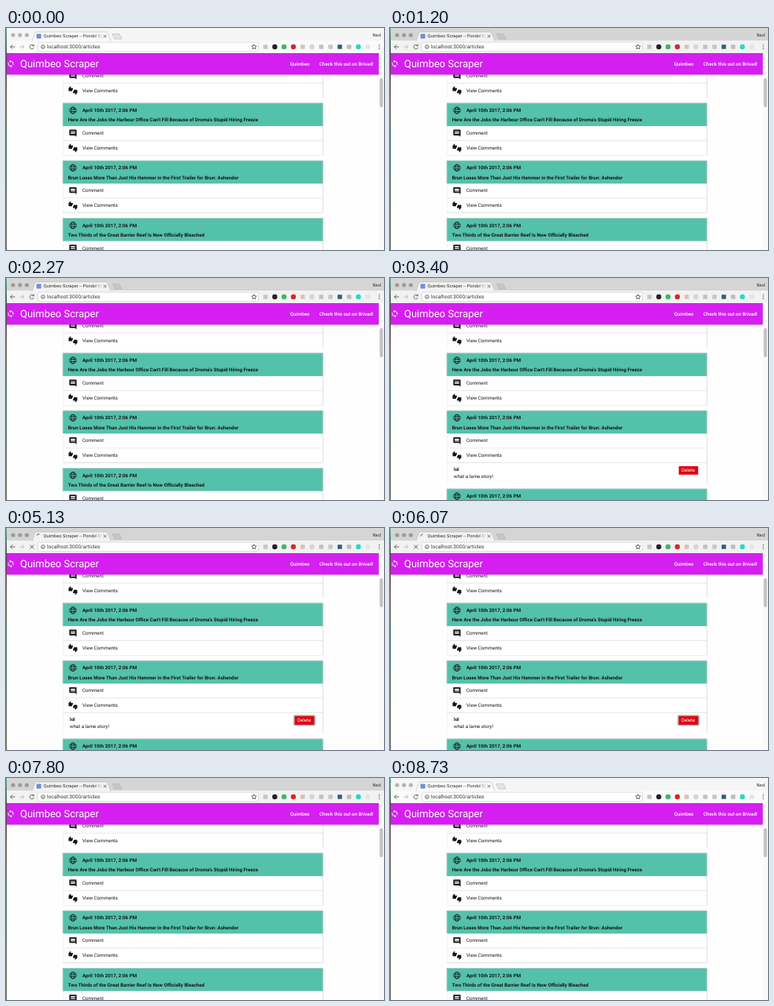
An HTML page for the animation above (8.87 s loop, 480 px wide and 283 px high).

```html
<!DOCTYPE html>
<html lang="en">
<head>
<meta charset="utf-8">
<title>Quimbeo Scraper</title>
<style>
  html, body { margin: 0; width: 100%; height: 100%; overflow: hidden; background: #fff; }
  svg { display: block; }
  text { font: 6.17px Roboto, sans-serif; text-rendering: geometricPrecision; fill: #161616; }
  .b { font-weight: 700; }
  .w { fill: #fff; }
  .link { font-weight: 500; }
  .brand { font-size: 13px; }
  .ui { font-size: 5.75px; fill: #333; }
  .url { font-size: 6.55px; }
  .strip { fill: #d5d5d5; }
  .bar { fill: #f2f2f2; }
  .light { fill: #9b9b9b; }
  .off .strip { fill: #f5f5f5; }
  .off .bar { fill: #fafafa; }
  .off .light { fill: #b4b4b4; }
  .line { stroke: #ddd; stroke-width: .7; }
  .edge { fill: none; stroke: #ddd; stroke-width: .5; }
  .pen { fill: none; stroke: #555; stroke-width: .9; }
  .pale { stroke: #bbb; }
  .card { filter: drop-shadow(0 .9px .7px #0005); }
  .teal { fill: #54c1aa; }
</style>
</head>
<body>
<script>
const LOOP = 8870;
const ACTIVE = [1000, 7870];
const OPEN = 2560, SLIDE = 350, EXTRA = 26.5;
const FOCUS = 5000, LOAD = [5070, 6260], RELOADED = 6200;
const TOP = 22.4, PITCH = 73.3, BODY = 37.2;

const ICONS = {
  comment: 'M22 4c0-1.1-.9-2-2-2H4c-1.1 0-2 .9-2 2v12c0 1.1.9 2 2 2h14l4 4V4zm-4 10H6v-2h12v2zm0-3H6V9h12v2zm0-3H6V6h12v2z',
  thumbs: 'M12 6c0-.55-.45-1-1-1H5.82l.66-3.18.02-.23c0-.31-.13-.59-.33-.8L5.38 0 .44 4.94C.17 5.21 0 5.59 0 6v6.5c0 .83.67 1.5 1.5 1.5h6.75c.62 0 1.15-.38 1.38-.91l2.26-5.29c.07-.17.11-.36.11-.55V6zm10.5 4h-6.75c-.62 0-1.15.38-1.38.91l-2.26 5.29c-.07.17-.11.36-.11.55V18c0 .55.45 1 1 1h5.18l-.66 3.18-.02.24c0 .31.13.59.33.8l.79.78 4.94-4.94c.27-.27.44-.65.44-1.06v-6.5c0-.83-.67-1.5-1.5-1.5z',
  sync: 'M12 4V1L8 5l4 4V6c3.31 0 6 2.69 6 6 0 1.01-.25 1.97-.7 2.8l1.46 1.46C19.54 15.03 20 13.57 20 12c0-4.42-3.58-8-8-8zm0 14c-3.31 0-6-2.69-6-6 0-1.01.25-1.97.7-2.8L5.24 7.74C4.46 8.97 4 10.43 4 12c0 4.42 3.58 8 8 8v3l4-4-4-4v3z'
};

const rect = (x, y, w, h, attrs = '') => `<rect x="${x}" y="${y}" width="${w}" height="${h}" ${attrs}/>`;
const text = (x, y, s, cls = '') => `<text x="${x}" y="${y}" class="${cls}">${s}</text>`;
const dot = (x, y, r, attrs) => `<circle cx="${x}" cy="${y}" r="${r}" ${attrs}/>`;
const icon = (name, cx, cy, fill = '#161616', k = .46) =>
  `<path transform="translate(${cx} ${cy}) scale(${k}) translate(-12 -12)" d="${ICONS[name]}" fill="${fill}"/>`;
const globe = (cx, cy) => `<g transform="translate(${cx} ${cy})" fill="none" stroke="#161616" stroke-width=".8">
  <circle r="4.2"/><ellipse rx="1.9" ry="4.2"/><path d="M-3.8-1.5H3.8M-3.8 1.5H3.8"/></g>`;

const comment = `<path class="line" d="M0 37.2H330"/>
  ${text(9, 47.8, 'lol', 'b')}${text(9, 56.8, 'what a lame story!')}
  ${rect(293.5, 40.5, 27, 12.8, 'id="ring" rx="1.5" fill="#b9b0b0" stroke="#8a7f7f" stroke-width=".5"')}
  ${rect(294.7, 41.6, 24.6, 10.8, 'fill="#e0000f"')}${text(298, 49.2, 'Delete', 'w')}`;

const card = (title, i) => `<g id="card${i}" class="card" transform="translate(72 ${TOP + i * PITCH})">
  ${rect(0, 0, 330.5, 29.3, 'class="teal"')}
  <path class="edge" d="M.2 29V.2H330.3V29"/>
  ${globe(13, 9.3)}${text(25, 11.4, 'April 10th 2017, 2:06 PM', 'b')}${text(6.7, 23.6, title, 'b')}
  <svg id="body${i}" y="29.3" width="330.5" height="${BODY}">
    ${rect(0, 0, 330.5, 70, 'fill="#fff"')}
    <path class="edge" d="M0 .2H330.5M.2 0V70M330.3 0V70"/>
    ${icon('comment', 13, 9.2)}${text(25, 11.2, 'Comment')}
    <path class="line" d="M0 18.5H330"/>
    ${icon('thumbs', 13, 28)}${text(25, 29.9, 'View Comments')}
    ${i === 2 ? comment : ''}
  </svg></g>`;

const titles = [
  '',
  "Here Are the Jobs the Harbour Office Can't Fill Because of Droma's Stupid Hiring Freeze",
  'Brun Loses More Than Just His Hammer in the First Trailer for Brun: Ashendor',
  'Two Thirds of the Great Barrier Reef Is Now Officially Bleached'
];

const round = ['#222', '#3fb56c', '#d8262c', '#d5d5d5', '#20dcc0'];
const extensions = ['#c0cabf', '#222', '#3fb56c', '#d8262c', '#dcc0b8', '#d5d5d5', '#c2c2c2', '#c6c6c6', '#2f5f78', '#bdbdbd', '#20dcc0', '#e4e4e4']
  .map((c, i) => {
    const x = 329.5 + i * 11.8;
    return round.includes(c) ? dot(x, 24, 3.2, `fill="${c}"`) : rect(x - 2.8, 21.2, 5.6, 5.6, `rx=".6" fill="${c}"`);
  }).join('');

const browser = `${rect(0, 0, 480, 17, 'class="strip"')}${rect(0, 16, 480, 16, 'class="bar"')}
  <path class="bar" d="M33 16.5L37 6Q37.5 5 39 5H127Q128.5 5 129 6L133 16.5Z" stroke="#aaa" stroke-width=".5"/>
  ${rect(33.5, 16, 99, 1.2, 'class="bar"')}
  <path d="M135 7.5H144L147 14H138Z" fill="#0001" stroke="#aaa" stroke-width=".5"/>
  ${[9, 17.7, 26.4].map(x => dot(x, 9, 2.6, 'class="light"')).join('')}
  ${rect(38.7, 7.6, 6, 6, 'id="favicon" rx="1" fill="#6d8fd6"')}
  <path id="spinner" class="pen" d="M0-2.7A2.7 2.7 0 0 1 2.7 0"/>
  ${text(47.5, 12.3, 'Quimbeo Scraper -- Pondel M', 'ui')}
  ${rect(110, 6.5, 13, 8, 'fill="url(#fade)"')}
  <path class="pen" d="M124 8.8l3.4 3.4m0-3.4l-3.4 3.4"/>
  ${text(465.5, 10.8, 'Ned', 'ui')}
  ${rect(40.5, 18.2, 280, 11.6, 'rx="1.5" fill="#fff" stroke="#c8c8c8" stroke-width=".6"')}
  <path class="pen" d="M11.5 24H5.5m2.7-2.7L5.5 24l2.7 2.7"/>
  <path class="pen pale" d="M17 24h6m-2.7-2.7L23 24l-2.7 2.7"/>
  <path id="reload" class="pen" d="M34.8 22.2A2.7 2.7 0 1 0 35.4 25M35.3 20.8v2h-2"/>
  <path id="stop" class="pen" d="M30.4 21.5l5 5m0-5l-5 5"/>
  ${dot(47, 24, 2.3, 'class="pen"')}<path class="pen" d="M47 23.7v1.6"/>
  <path class="pen" d="M315 20.8l.9 2.1 2.3.2-1.7 1.5.5 2.2-2-1.2-2 1.2.5-2.2-1.7-1.5 2.3-.2z"/>
  ${extensions}
  ${[21.6, 24, 26.4].map(y => dot(474, y, .75, 'fill="#666"')).join('')}
  ${text(52, 26.2, 'localhost:3000/articles', 'ui url')}`;

const navbar = `${rect(1, 59.5, 472.5, 1, 'fill="#0002"')}${rect(1, 32, 472.5, 27.5, 'fill="#d41ff0"')}
  ${icon('sync', 6, 45.6, '#fff', .45)}${text(18, 50.2, 'Quimbeo Scraper', 'w brand')}
  ${text(360.7, 47.5, 'Quimbeo', 'w link')}${text(398, 47.5, 'Check this out on Brivad!', 'w link')}`;

document.body.innerHTML = `<svg id="stage" width="480" height="283" viewBox="0 0 480 283">
  <defs>
    <linearGradient id="fade"><stop stop-color="#f2f2f2" stop-opacity="0"/><stop offset="1" stop-color="#f2f2f2"/></linearGradient>
    <linearGradient id="desk" x2="0" y2="1"><stop stop-color="#5fae98"/><stop offset=".12" stop-color="#444"/>
      <stop offset=".3" stop-color="#7a5448"/><stop offset=".5" stop-color="#3f6f68"/><stop offset="1" stop-color="#6a645c"/></linearGradient>
  </defs>
  ${rect(0, 0, 480, 283, 'fill="#fefefe"')}
  ${titles.map(card).join('')}
  ${rect(473.5, 32, 6.5, 251, 'fill="#fafafa"')}${rect(474.6, 64, 4, 37, 'rx="2" fill="#c1c1c1"')}
  ${browser}${navbar}
  ${rect(0, 0, 1, 283, 'fill="url(#desk)"')}
</svg>`;

const $ = id => document.getElementById(id);
const within = (t, [a, b]) => t >= a && t < b;
const show = (id, on) => $(id).setAttribute('visibility', on ? 'visible' : 'hidden');

function draw() {
  const t = performance.now() % LOOP;
  const p = Math.min(1, Math.max(0, (t - OPEN) / SLIDE));
  const grow = t < RELOADED ? EXTRA * (1 - (1 - p) ** 4) : 0;
  const loading = within(t, LOAD);

  $('stage').classList.toggle('off', !within(t, ACTIVE));
  $('body2').setAttribute('height', BODY + grow);
  $('card3').setAttribute('transform', `translate(72 ${TOP + 3 * PITCH + grow})`);
  show('ring', within(t, [FOCUS, RELOADED]));
  show('favicon', !loading);
  show('reload', !loading);
  show('spinner', loading);
  show('stop', loading);
  $('spinner').setAttribute('transform', `translate(41.7 10.6) rotate(${(t - LOAD[0]) * .36 - 90})`);
  requestAnimationFrame(draw);
}
requestAnimationFrame(draw);
</script>
</body>
</html>
```
